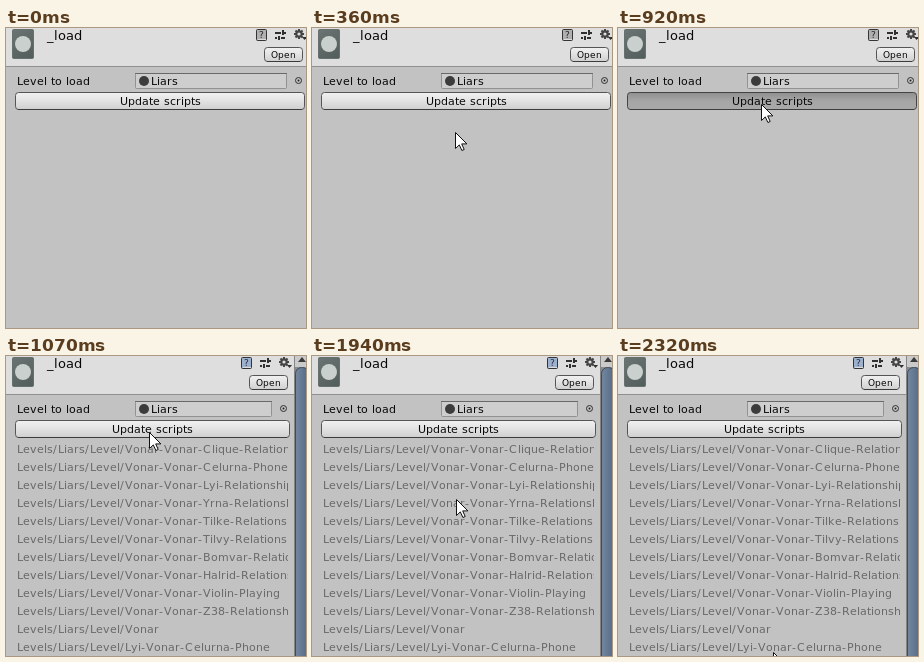
Animation of 300 by 300 pixels, one loop 2350 ms. Source, as an HTML page with a canvas:

```html
<!DOCTYPE html>
<html lang="en">
<head>
<meta charset="utf-8">
<title>Inspector</title>
<style>
html, body { margin: 0; width: 100%; height: 100%; overflow: hidden; background: #c2c2c2; }
canvas { display: block; width: 300px; height: 300px; }
</style>
</head>
<body>
<canvas id="stage" width="300" height="300"></canvas>
<script>
const ctx = document.getElementById('stage').getContext('2d');
const LOOP = 2350, ENTER = 50, PRESS = 920, LISTED = 1070, LEAVE = 1760;
const FONT = '"DejaVu Sans", sans-serif';
const LEAD = 'Vonar';
const FRIENDS = ['Lyi', 'Yrna', 'Tilke', 'Tilvy', 'Bomvar', 'Halrid'];
const PAIRS = [
  'Clique-Relationship', 'Celurna-Phone',
  ...FRIENDS.map(name => name + '-Relationship'),
  'Violin-Playing', 'Z38-Relationship'
];
const ROWS = [
  ...PAIRS.map(pair => `${LEAD}-${LEAD}-${pair}`),
  LEAD, `Lyi-${LEAD}-Celurna-Phone`
].map(name => 'Levels/Liars/Level/' + name);

// Glyphs advance by whole pixels, like hinted interface text.
function text(str, x, y, size = 11, color = '#080808') {
  ctx.font = `${size}px ${FONT}`;
  ctx.fillStyle = color;
  for (const ch of str) {
    ctx.fillText(ch, x, y);
    x += Math.ceil(ctx.measureText(ch).width - 0.34) + ('/-C'.includes(ch) ? 1 : 0);
  }
}

function rect(x, y, w, h, color) {
  ctx.fillStyle = color;
  ctx.fillRect(x, y, w, h);
}

function disc(x, y, r, color) {
  ctx.fillStyle = color;
  ctx.beginPath();
  ctx.arc(x, y, r, 0, Math.PI * 2);
  ctx.fill();
}

function triangle(x, y, w, h, color) {
  ctx.fillStyle = color;
  ctx.beginPath();
  ctx.moveTo(x, y);
  ctx.lineTo(x + w, y);
  ctx.lineTo(x + w / 2, y + h);
  ctx.fill();
}

function shade(x0, y0, x1, y1, ...colors) {
  const g = ctx.createLinearGradient(x0, y0, x1, y1);
  colors.forEach((c, i) => g.addColorStop(i / (colors.length - 1), c));
  return g;
}

function box(x, y, w, h, r, fill, edge) {
  ctx.beginPath();
  ctx.roundRect(x + 0.5, y + 0.5, w - 1, h - 1, r);
  ctx.fillStyle = fill;
  ctx.fill();
  ctx.strokeStyle = edge;
  ctx.lineWidth = 1;
  ctx.stroke();
}

function button(x, y, w, h, pressed) {
  const fill = pressed
    ? shade(0, y, 0, y + h, '#8e8e8e', '#a6a6a6', '#a9a9a9')
    : shade(0, y, 0, y + h, '#f2f2f2', '#e2e2e2', '#cecece');
  box(x, y, w, h, 3, fill, pressed ? '#444' : '#555');
  rect(x + 3, y + h - 1, w - 6, 1, '#3c3c3c');
}

function sceneIcon() {
  box(6, 1, 22, 30, 1, shade(6, 1, 28, 31, '#6b7573', '#515d5b'), '#66716f');
  disc(17, 16, 8, '#c9d0ce');
}

function helpIcon(x, paper, ink) {
  box(x, 1, 11, 12, 1, paper, '#343434');
  rect(x + 2, 11, 8, 1, '#dcdcdc');
  text('?', x + 3, 10, 9, ink);
}

function sliderIcon(x) {
  const c = '#303030';
  rect(x, 4, 6, 2, c);
  rect(x + 7, 2, 2, 5, c);
  rect(x + 9, 4, 2, 2, c);
  rect(x, 9, 2, 2, c);
  rect(x + 3, 8, 2, 4, c);
  rect(x + 6, 9, 4, 2, c);
}

function gearIcon(x) {
  ctx.save();
  ctx.translate(x, 6);
  for (let i = 0; i < 4; i++) {
    rect(-1, -5, 2, 10, '#454545');
    ctx.rotate(Math.PI / 4);
  }
  disc(0, 0, 3.7, '#454545');
  disc(0, 0, 1.6, '#dedede');
  ctx.restore();
  triangle(x + 3, 9, 5, 3, '#303030');
}

function scrollbar() {
  rect(288, 0, 12, 300, shade(288, 0, 300, 0, '#848484', '#a6a6a6'));
  rect(289, 0, 11, 11, '#cacaca');
  triangle(292, 6, 8, -5, '#3a3a3a');
  box(289, 11, 14, 310, 6, shade(289, 0, 303, 0, '#7488a2', '#536880'), '#3d4b5d');
}

function panel(listed, pressed) {
  const d = listed ? -15 : 0;
  rect(0, 0, 300, 300, '#c2c2c2');
  rect(0, 0, 300, 38, '#dedede');
  rect(0, 38, 300, 1, '#8f8f8f');
  sceneIcon();
  text('_load', 41, 12, 13);
  if (listed) helpIcon(235, '#9db0cc', '#20304c');
  else helpIcon(250, '#b0b0b0', '#282828');
  sliderIcon(269 + d);
  gearIcon(293 + d);
  button(258 + d, 19, 39, 15);
  text('Open', 265 + d, 30, 9);

  text('Level to load', 11, 57);
  box(129, 45, 152 + d, 16, 1, '#cecece', '#929292');
  rect(129, 45, 152 + d, 1, '#696969');
  disc(138, 53, 5, '#3c3c3c');
  text('Liars', 145, 57);
  ctx.beginPath();
  ctx.arc(292.5 + d, 52.5, 3, 0, Math.PI * 2);
  ctx.strokeStyle = '#303030';
  ctx.stroke();
  disc(292.5 + d, 52.5, 1, '#202020');

  button(9, 64, 290 + d, 18, pressed);
  text('Update scripts', listed ? 106 : 114, 77);

  if (!listed) return;
  ctx.save();
  ctx.beginPath();
  ctx.rect(9, 84, 273, 216);
  ctx.clip();
  ROWS.forEach((row, i) => text(row, 11, 97 + i * 18, 11, '#696969'));
  ctx.restore();
  scrollbar();
}

// Held poses of a pointer move, counted from its start.
function poseAt(ms) {
  if (ms < 0) return 0;
  return ms < 310 ? 1 + Math.floor(ms / 310 * 7) : 8 + Math.floor((ms - 310) / 50);
}

function pointerAt(t) {
  if (t < LEAVE) {
    const k = Math.max(0, 12 - poseAt(t - ENTER));
    return [143 + 22 * (k / 11) ** 4, 76 + 1.75 * k * k];
  }
  const n = poseAt(t - LEAVE);
  const lift = n > 12 ? 4 : 0;
  return [143 + 11 * (n / 12) ** 2, 76 + 19 * n - 31 * (1 - Math.exp(-n / 2)) + lift];
}

const ARROW = new Path2D('M.5 .5V16.5L4.3 12.9L6.9 18.5L9.2 17.5L6.7 11.9H11.9Z');

function pointer(x, y) {
  ctx.save();
  ctx.translate(Math.floor(x), Math.round(y));
  ctx.fillStyle = '#fff';
  ctx.fill(ARROW);
  ctx.strokeStyle = '#111';
  ctx.lineWidth = 1;
  ctx.stroke(ARROW);
  ctx.restore();
}

function draw(now) {
  const t = now % LOOP;
  panel(t >= LISTED, t >= PRESS && t < LISTED);
  pointer(...pointerAt(t));
}

const start = performance.now();
function tick() {
  draw(performance.now() - start);
  requestAnimationFrame(tick);
}
draw(0);
requestAnimationFrame(tick);
</script>
</body>
</html>
```
